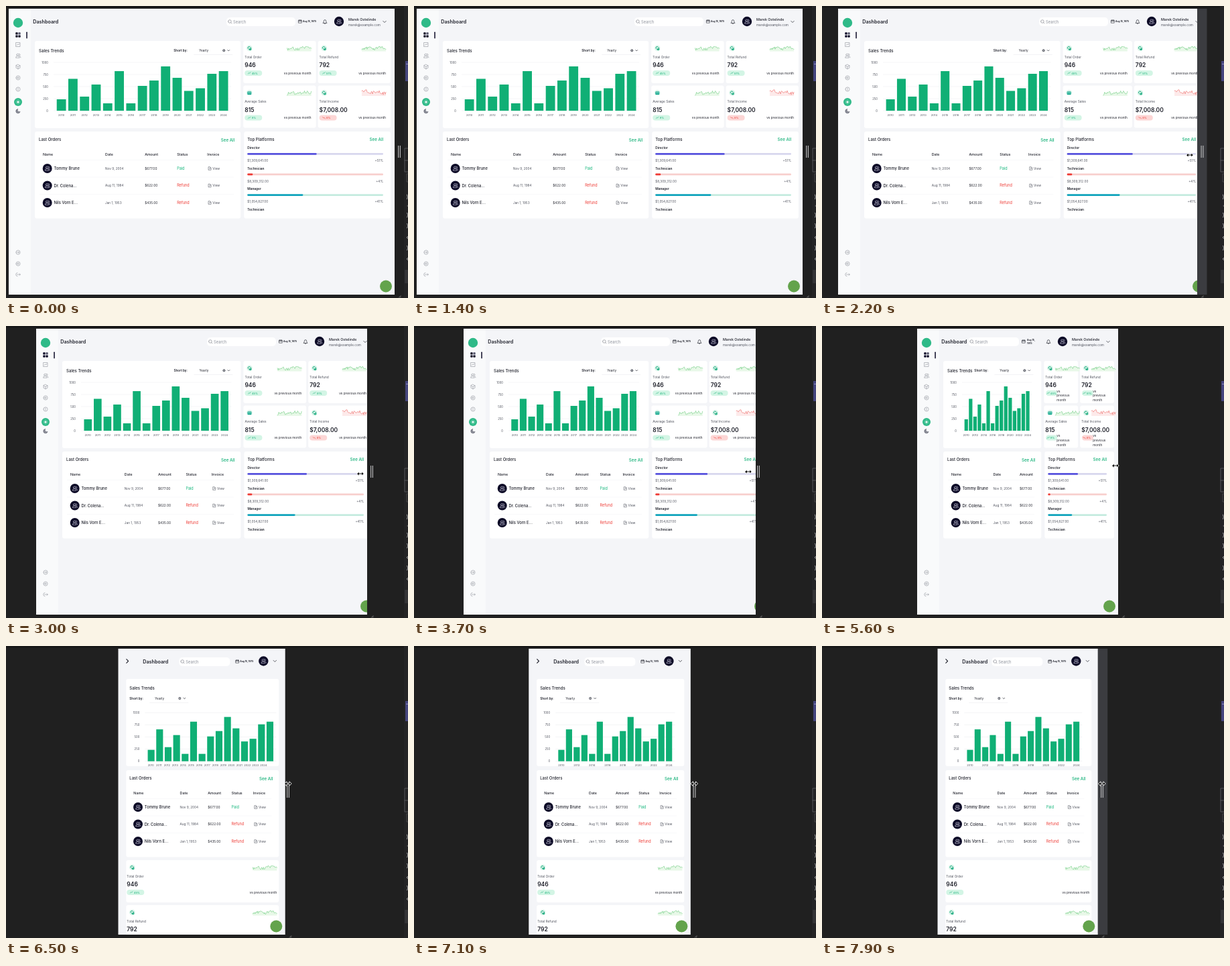
An HTML page for the animation above (8 s loop, 600 by 435 pixels).

```html
<!DOCTYPE html>
<html lang="en">
<head>
<meta charset="utf-8">
<title>Responsive dashboard</title>
<style>
  html, body { margin: 0; width: 100%; height: 100%; overflow: hidden; background: #202020; }
  #stage { display: block; width: 600px; height: 435px; font-family: Inter, "Open Sans", sans-serif; }
</style>
</head>
<body>
<svg id="stage" viewBox="0 0 600 435"></svg>
<script>
const LOOP = 8000, STEP = 100, BREAK = 270;
const INK = '#20222c', SOFT = '#50535e', GREY = '#8d919b', GREEN = '#10af75', RED = '#ee3b35', NAVY = '#0c0a26';

// time, page left, layout width, handle x, cursor x, cursor y, chart lag
const KEYS = [
  [0, 4, 576, 587, 640, 240, 0],
  [1500, 4, 576, 587, 612, 236, 0],
  [2000, 4, 576, 587, 587, 224, 0],
  [2100, 4, 576, 587, 580, 223, 0],
  [2200, 24, 551, 567.5, 549, 222, 0],
  [3000, 45, 506, 546, 529, 220, 0],
  [3400, 61, 476, 528, 512, 218, 0],
  [3700, 74, 456, 514, 499, 217, 0],
  [4300, 90, 422, 496, 488, 215, 0],
  [4700, 115.7, 370, 470, 469, 214, 0],
  [5000, 125, 344, 460, 457, 212, 0],
  [5600, 142, 300, 441, 438, 208, 0],
  [5800, 146, 292, 437, 436, 207, 0],
  [6500, 167.3, 249, 421, 421, 205, 10],
  [6900, 170, 243.5, 419, 419, 205, 0],
  [7300, 172.3, 239, 418, 418, 205, 0],
  [8000, 172.3, 239, 418, 418, 205, 0]
];
const SALES = [236, 660, 292, 542, 153, 819, 153, 514, 625, 917, 681, 410, 465, 764, 819];
const ORDERS = [
  ['Tommy Brune', 'Nov 9, 2004', '$677.00', 'Paid'],
  ['Dr. Colena...', 'Aug 11, 1984', '$622.00', 'Refund'],
  ['Nils Vorn E...', 'Jan 1, 1953', '$435.00', 'Refund']
];
const STATS = [
  ['Total Order', '946', '45%', 3],
  ['Total Refund', '792', '51%', 8],
  ['Average Sales', '815', '9%', 15],
  ['Total Income', '$7,008.00', '8%', 22]
];
const PLATFORMS = [
  ['Director', '$1,309,641.00', 51, '#5954de', '#d8d7ee'],
  ['Technician', '$8,309,312.00', 4, RED, '#f8cfcd'],
  ['Manager', '$1,054,827.00', 41, '#12a4bd', '#c5ebdf']
];
const PEOPLE = 'M-2.2-1.3a1.6 1.6 0 1 1 3.2 0a1.6 1.6 0 1 1-3.2 0M-3.4 2.8q0-2.4 2.8-2.4t2.8 2.4zM1.4-2.8q1.7 0 1.7 1.5t-1.5 1.5M2.6.8q1.4.4 1.4 2';
const RING = 'M-3.1 0a3.1 3.1 0 1 1 6.2 0a3.1 3.1 0 1 1-6.2 0';
const ICONS = [
  [57.5, 'M-3-3h6v6h-6zM-1.9 1l1.4-1.7 1.1 1.2L2-1.3'],
  [74, PEOPLE],
  [90.5, 'M0-3.3l3 1.6v3.4l-3 1.6-3-1.6v-3.4zM-3-1.7l3 1.7 3-1.7M0 0v3.3'],
  [107, RING + 'M-1.2 0a1.2 1.2 0 1 1 2.4 0a1.2 1.2 0 1 1-2.4 0'],
  [124, RING + 'M0-1.6v1.9M0 1.2v.5'],
  [367, RING + 'M-1.5 0h3M.4-1.1l1.1 1.1-1.1 1.1'],
  [384, RING + 'M-1.2 0a1.2 1.2 0 1 1 2.4 0a1.2 1.2 0 1 1-2.4 0'],
  [400, 'M-1-2.7q-2.3.4-2.3 2.7t2.3 2.7M-1.5 0h4.8M2-1.2l1.3 1.2-1.3 1.2']
];

const text = (x, y, s, size, fill = INK, weight = 400, anchor = 'start') =>
  `<text x="${x}" y="${y + size * .36}" font-size="${size}" fill="${fill}" font-weight="${weight}" text-anchor="${anchor}">${s}</text>`;
const rect = (x, y, w, h, fill, r = 0) =>
  `<rect x="${x}" y="${y}" width="${Math.max(0, w)}" height="${h}" rx="${r}" fill="${fill}"/>`;
const disc = (x, y, r, fill) => `<circle cx="${x}" cy="${y}" r="${r}" fill="${fill}"/>`;
const line = (x, y, d, stroke = INK, w = .7, fill = 'none') =>
  `<path transform="translate(${x} ${y})" d="${d}" fill="${fill}" stroke="${stroke}" stroke-width="${w}" stroke-linecap="round" stroke-linejoin="round"/>`;
const clip = (x, y, w, h, body) =>
  `<svg x="${x}" y="${y}" width="${w}" height="${h}" viewBox="${x} ${y} ${w} ${h}">${body}</svg>`;
const chevron = (x, y, k = 2) => line(x, y, `M${-k} ${-k / 2}l${k} ${k}l${k} ${-k}`);
const avatar = (x, y, r) => disc(x, y, r, NAVY) + line(x, y, PEOPLE, '#d8d8ea', .6);

function sparkline(seed, falling) {
  let r = seed * 7919, top = '';
  for (let i = 0; i <= 36; i++) {
    r = (r * 16807 + 11) % 2147483647;
    const trend = falling ? i / 14 - 2 : 1.6 - i / 16;
    const y = trend + Math.sin(i / 3 + seed) * .9 + (r / 2147483647 - .5) * 4.4;
    top += `${i ? 'L' : 'M'}${i} ${y.toFixed(1)}`;
  }
  return top;
}
const SPARKS = STATS.map((s, i) => sparkline(s[3], i === 3));

function sidebar() {
  let out = rect(0, 4, 33, 426, '#f9fafb') + disc(14, 25, 7.2, '#2fba88');
  for (const [dx, dy] of [[-3.7, -3.7], [.4, -3.7], [-3.7, .4], [.4, .4]])
    out += rect(14 + dx, 43 + dy, 3.3, 3.3, dx > 0 && dy < 0 ? '#55566c' : NAVY, .7);
  out += rect(26.3, 38.5, 1.5, 10, NAVY, .7);
  for (const [y, d] of ICONS) out += line(14, y, d, '#8f929b', .6);
  out += disc(14, 143, 6, '#2fba88') + disc(14, 143, 1.5, '#fff');
  out += line(14, 143, 'M0-3v.4M0 2.6v.4M-3 0h.4M2.6 0h.4M-2-2l.2.2M2 2l-.2-.2M-2 2l.2-.2M2-2l-.2.2', '#fff', .6);
  return out + line(14, 156.5, 'M-.6-3a3.2 3.2 0 1 0 3.7 3.8a2.8 2.8 0 0 1-3.7-3.8z', '#50525f', .5, '#8b8d98');
}

function header(w, narrow) {
  const title = narrow ? 37 : 36.3;
  const from = narrow ? w - 158 : Math.max(w - 251, title + 40), to = narrow ? w - 82 : w - 148;
  const date = narrow ? w - 71 : w - 141;
  let out = text(title, 23.5, 'Dashboard', 7.2, INK, 600);
  if (narrow) out += line(14, 22.5, 'M-1.5-2.8l2.8 2.8-2.8 2.8', INK, 1.1);
  out += rect(from, 17, to - from, 13, '#fff', 5);
  out += line(from + 5, 23, 'M-2.4 0a2.3 2.3 0 1 1 4.6 0a2.3 2.3 0 1 1-4.6 0M1.7 1.7l1.3 1.3', '#777a84', .6);
  out += text(from + 10, 23.5, 'Search', 5.8, GREY);
  out += line(date, 23, 'M-2.2-1.8h4.4v4h-4.4zM-2.2-.5h4.4M-1.1-2.5v1M1.1-2.5v1', INK, .6);
  if (!narrow && w < 330)
    out += text(date + 5, 21, 'Aug 15,', 3.3, INK, 700) + text(date + 5, 25.6, '1975', 3.3, INK, 700);
  else out += text(date + 4, 23, 'Aug 15, 1975', 3.3, INK, 700);
  if (narrow) return out + avatar(w - 32, 22.5, 7.2) + chevron(w - 15, 22.5, 2.2);
  out += line(w - 104, 23.5, 'M-2.7 1.7q1-1 1-2.6q0-2 1.7-2t1.7 2q0 1.6 1 2.6zM-.7 2.8h1.4', INK, .65);
  out += avatar(w - 83, 23, 7.2);
  out += text(w - 69, 20, 'Marek Ostelinde', 5.3, INK, 500) + text(w - 69, 28, 'marek@example.com', 4.7, SOFT);
  return out + chevron(w - 15, 23.5, 2.2);
}

function salesCard(c, w, narrow, lag) {
  const right = c + w, top = narrow ? 49 : 52, base = narrow ? 171.7 : 156;
  const pick = narrow ? c + 5 : right - 100, pickY = narrow ? 78 : 66.3;
  let out = rect(c, top, w, 130, '#fff', 3);
  out += text(c + (narrow ? 5 : 6), narrow ? 63 : 66.5, 'Sales Trends', 6.1, INK, 500);
  out += text(pick, pickY, 'Short by:', 4.7, INK, 600) + text(pick + 38, pickY, 'Yearly', 4.7);
  out += disc(pick + 75, pickY, 2, '#60636c') + line(pick + 75, pickY, 'M-.7-.7l1.4 1.4M.7-.7l-1.4 1.4', '#fff', .5);
  out += chevron(pick + 82, pickY, 1.4);
  out += rect(pick + 30, pickY + 6.2, 58, .5, '#e6e7eb');

  const x0 = c + 31, x1 = right - 17, slot = (x1 - x0) / 15, barSlot = (x1 + lag - x0) / 15;
  for (let v = 0; v <= 1000; v += 250) {
    const y = base - v * .072;
    out += text(c + 20, y, v, 4.2, SOFT, 400, 'end') + rect(x0 - 3, y - .2, x1 + lag - x0 + 6, .4, '#e4e5e9');
  }
  SALES.forEach((v, i) => {
    out += rect(x0 + barSlot * (i + .1), base - v * .072, barSlot * .8, v * .072, GREEN);
    if (slot >= 12 || i % 2 === 0)
      out += text(x0 + slot * (i + .5), base + (narrow ? 6.3 : 7), 2010 + i, 4.1, SOFT, 400, 'middle');
  });
  return out;
}

function ordersCard(c, w, narrow) {
  const y = narrow ? 185 : 187, d = 307 - w, left = c + (narrow ? 11 : 12);
  const cols = [[93, .3, 62.5], [152, .52, 102], [200, .68, 134], [245, .84, 165]]
    .map(([start, k, min]) => left + Math.max(min, start - k * d));
  let out = rect(c, y, w, 129.5, '#fff', 3);
  out += text(c + (narrow ? 5 : 6), y + 12.3, 'Last Orders', 6, INK, 500);
  out += text(c + w - 9, y + 12.3, 'See All', 6.2, GREEN, 500, 'end');
  let rows = text(left, y + 33.6, 'Name', 5.4, INK, 500);
  ['Date', 'Amount', 'Status', 'Invoice'].forEach((s, i) => rows += text(cols[i], y + 33.6, s, 5.3, INK, 500));
  ORDERS.forEach(([name, date, sum, state], i) => {
    const ry = y + 55 + i * 25.5;
    rows += rect(left - 5, ry - 12.7, w - 17, .4, '#eeeff2');
    rows += avatar(left + 6.7, ry, 7) + text(left + 16.5, ry + .2, name, 5.8, INK, 500);
    rows += text(cols[0], ry, date, 4.7, SOFT) + text(cols[1], ry, sum, 4.8, INK);
    rows += text(cols[2], ry, state, 5.5, i ? RED : '#16b67c');
    rows += line(cols[3] + 4, ry, 'M-1.8-2.3h2.3l1.4 1.4v3.2h-3.7zM-.6.9l1.6-1.6M1-.7h-1.2', SOFT, .55);
    rows += text(cols[3] + 8, ry, 'View', 4.8, SOFT);
  });
  return out + clip(c, y, w - 10, 129, rows);
}

function statCard(i, x, y, w, narrow) {
  const [label, value, pct] = STATS[i], down = i === 3, tone = down ? RED : GREEN;
  const tight = w < 80, tiny = w < 60;
  const end = narrow ? x + w - 3 : x + w - 10;
  const spark = Math.max(x + 17, end - 36);
  let out = rect(x, y, narrow ? w : w - 3, 63, '#fff', 3);
  out += disc(x + 9, y + 10.7, 4.2, '#d9f4e9');
  out += i === 2 ? rect(x + 6, y + 9, 6, 4.6, '#18a890', 1) + rect(x + 6.4, y + 10.4, 5.2, .8, '#b7eadb')
    : line(x + 9, y + 10.5, 'M-2.4.4a2 2 0 0 1 3.6-1.5M2.4-.2a2 2 0 0 1-3.6 1.6M.6 1.3h2v1.6h-2z', '#18a97d', 1);
  out += line(spark, y + 10.5, SPARKS[i] + 'L36 5L0 5Z', 'none', 0, down ? '#fdeaea' : '#e8f8e8');
  out += line(spark, y + 10.5, SPARKS[i], down ? '#ee6b67' : '#6ccb7e', .6);
  const tx = narrow ? x + 1 : x + 2;
  out += text(tx, y + 24, label, 4.8, SOFT) + text(tx, y + 36, value, 8.5, INK, 600);
  out += rect(tx + (tight ? 1 : 0), y + 44, tight ? 17 : 26, 8, down ? '#fcd6d5' : '#d3f5e5', 4);
  out += line(tx + (tight ? 4.5 : 7), y + 48, down ? 'M-2-1l1.5 1.5.8-.7 1.5 1.4' : 'M-2 1l1.5-1.5.8.7 1.5-1.4', tone, .6);
  out += text(tx + (tight ? 7.5 : 10.5), y + 48.2, pct, 4, tone);
  if (narrow || !tight) return out + text(end, y + 48.2, 'vs previous month', 4.7, INK, 400, 'end');
  const words = tiny ? ['vs', 'previous', 'month'] : ['vs previous', 'month'];
  words.forEach((s, n) => out += text(x + (tiny ? 19 : 23), y + (tiny ? 45 : 45.3) + n * 6.8, s, 4.7));
  return out;
}

function platformsCard(x, w) {
  const left = x + 6, end = x + w - 11, span = end - left;
  let out = rect(x + 1, 187, w - 1, 129.5, '#fff', 3);
  out += text(left, 198.6, 'Top Platforms', 6.1, INK, 500) + text(end, 198.6, 'See All', 6.2, GREEN, 500, 'end');
  PLATFORMS.forEach(([name, sum, pct, tone, pale], i) => {
    const y = 211.3 + i * 30.6;
    out += text(left, y, name, 4.8, INK, 600);
    out += rect(left, y + 7.7, span, 2.7, pale, 1.3) + rect(left, y + 7.7, span * pct / 100, 2.7, tone, 1.3);
    out += text(left, y + 19.3, sum, 4.7, SOFT) + text(end, y + 19.3, `+${pct}%`, 4.7, SOFT, 400, 'end');
  });
  return out + text(left, 303, 'Technician', 4.8, INK, 600);
}

function page(w, lag) {
  const narrow = w < BREAK, c = narrow ? 12 : 39;
  const cw = narrow ? w - 21 : (w - 49) * .583;
  let out = rect(0, 4, 600, 426, '#f4f5f8');
  if (!narrow) out += sidebar();
  out += header(w, narrow) + salesCard(c, cw, narrow, lag) + ordersCard(c, cw, narrow);
  if (narrow) {
    for (let i = 0; i < 2; i++) out += statCard(i, c, 319 + i * 67, cw, true);
  } else {
    const x = c + cw + 4, rw = w - 6 - x, pitch = rw / 2 + 1.5;
    for (let i = 0; i < 4; i++) out += statCard(i, x + (i % 2) * pitch, i < 2 ? 52 : 118.5, pitch, false);
    out += platformsCard(x, rw);
  }
  return out + disc(w - 13, 417.5, 9, '#63a34c');
}

function backdrop() {
  let out = rect(0, 0, 600, 435, '#202020') + rect(0, 0, 600, 3, '#191919') + rect(594, 0, 6, 435, '#242425');
  out += rect(596, 82, 4, 30, '#45457c') + rect(597, 86, 3, 1, '#8f8fc0');
  out += line(595, 212, 'M5 0h-5v35h5M0 18h5', '#68686a', .7) + line(597, 250, 'M3 0h-2v12h2', '#555', .7);
  [')', '•', '}', '}', '‹', '}', '‹'].forEach((s, i) =>
    out += text(597.5, [284, 297, 311, 327, 344, 360, 376][i], s, 8, i === 1 ? '#666' : '#d5d5d5'));
  return out + rect(595, 393, 5, 20, '#343436');
}

function pose(t) {
  const i = KEYS.findIndex(k => k[0] > t), a = KEYS[i - 1], b = KEYS[i];
  const p = (t - a[0]) / (b[0] - a[0]);
  return a.map((v, n) => v + (b[n] - v) * p);
}

function draw(t) {
  const [, left, w, grip, cx, cy, lag] = pose(t), right = 584 - left, pw = right - left;
  let out = backdrop();
  if ((t >= 2000 && t < 2300) || t >= 7800) out += rect(right, 4, 14.5, 426, '#3b3c40');
  out += `<svg x="${left}" y="4" width="${pw}" height="426" viewBox="0 4 ${pw} 426">${page(w, lag)}</svg>`;
  if (grip >= right)
    out += rect(grip - 2, 208, 1.2, 18, '#b4b4b6') + rect(grip + .8, 208, 1.2, 18, '#b4b4b6');
  out += line(right + 8, 433, 'M-1.5 1.2l2.6-2.6M.3 1.2l1-1', '#aaa', .6);
  if (t >= 1500)
    out += line(cx, cy, 'M-5.2 0l3.2-3.2v2.3h4v-2.3l3.2 3.2-3.2 3.2v-2.3h-4v2.3z', '#fff', .9, '#000');
  stage.innerHTML = out;
}

const stage = document.getElementById('stage'), start = performance.now();
let shown = -1;
function tick() {
  const t = Math.floor(((performance.now() - start) % LOOP) / STEP) * STEP;
  if (t !== shown) draw(shown = t);
  requestAnimationFrame(tick);
}
tick();
</script>
</body>
</html>
```
